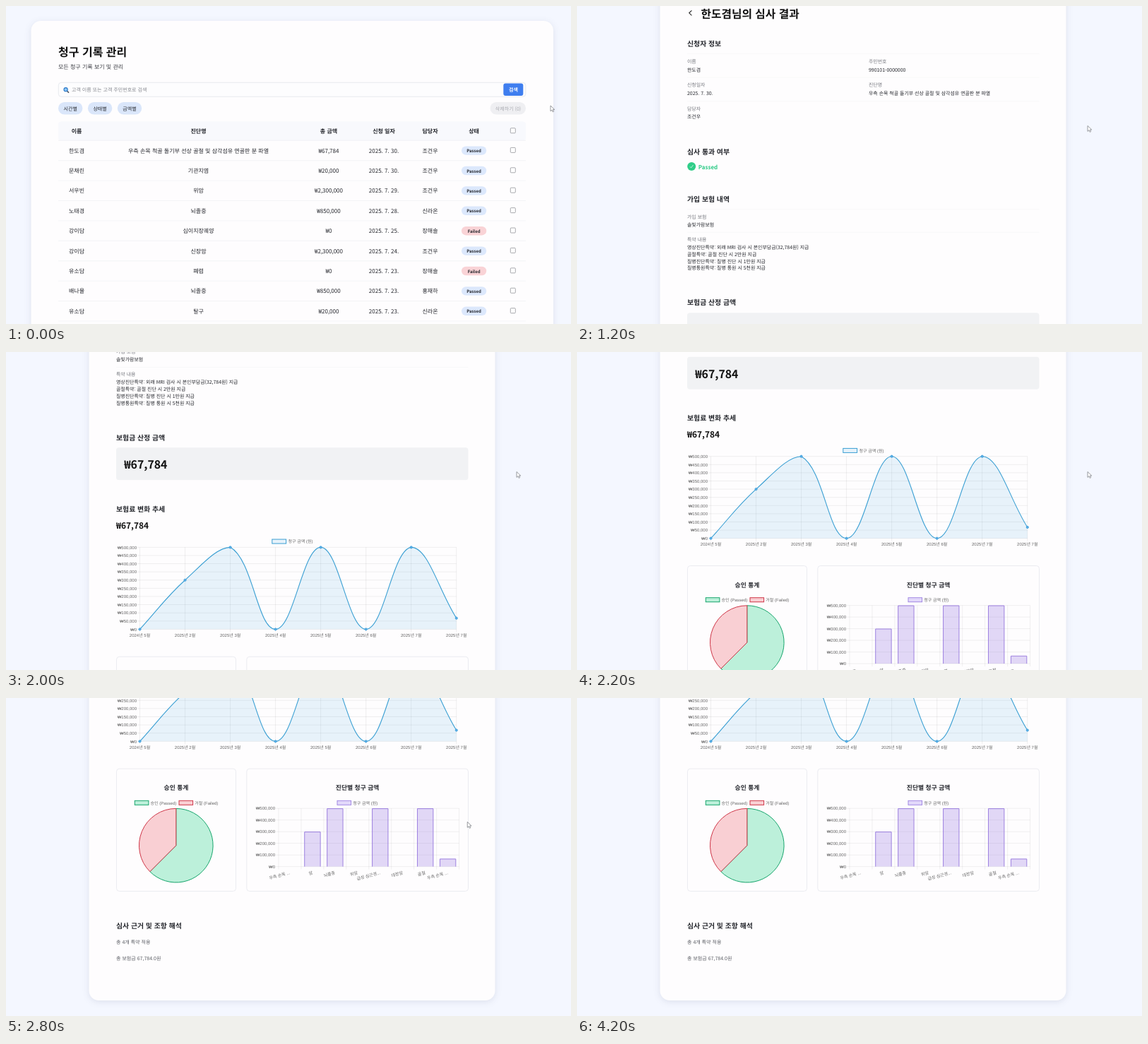
Animation of 800x450 px, one loop 4.3 s. Source, as an HTML page:

```html
<!DOCTYPE html>
<html lang="ko">
<head>
<meta charset="utf-8">
<title>청구 기록 관리</title>
<style>
html, body { margin: 0; width: 100%; height: 100%; overflow: hidden; background: #f4f7ff; }
svg { display: block; width: 800px; height: 450px; }
text {
  font-family: "Noto Sans CJK KR", "Noto Sans CJK", "Noto Sans", sans-serif;
  white-space: pre; text-rendering: geometricPrecision;
}
.ui { font-family: "Liberation Sans", "Noto Sans CJK KR", sans-serif; }
.card { fill: #fefdfe; filter: drop-shadow(0 2px 5px rgba(40, 50, 90, .11)); }
</style>
</head>
<body>
<svg id="stage" viewBox="0 0 800 450"></svg>
<script>
const LOOP = 4300, CUT = 500;
const INK = '#24262c', GREY = '#76787f';
const DIAGNOSIS = '우측 손목 척골 돌기부 선상 골절 및 삼각섬유 연골판 분 파열';
const PIE = { x: 240.8, y: 933.9, r: 52.3 };

// y is the optical middle of the line
function text(x, y, size, str, { fill = INK, weight = 400, anchor = 'start', cls = '', extra = '' } = {}) {
  return `<text class="${cls}" x="${x}" y="${y + size * .37}" font-size="${size}" fill="${fill}" ` +
    `font-weight="${weight}" text-anchor="${anchor}" ${extra}>${str}</text>`;
}
const mid = (x, y, size, str, o = {}) => text(x, y, size, str, { anchor: 'middle', ...o });
const ui = (x, y, str, o = {}) => text(x, y, 6, str, { cls: 'ui', fill: '#666', ...o });

function rect(x, y, w, h, r, fill, stroke = 'none', sw = 1) {
  return `<rect x="${x}" y="${y}" width="${w}" height="${h}" rx="${r}" fill="${fill}" stroke="${stroke}" stroke-width="${sw}"/>`;
}
function path(d, stroke, sw = 1, fill = 'none', extra = '') {
  return `<path d="${d}" fill="${fill}" stroke="${stroke}" stroke-width="${sw}" ${extra}/>`;
}
const card = (x, y, w, h) => `<rect class="card" x="${x}" y="${y}" width="${w}" height="${h}" rx="14"/>`;
const rule = (y, color = '#f6f6f8', x1 = 156, x2 = 654.5) => path(`M${x1} ${y}H${x2}`, color, .7);
const won = n => '₩' + n.toLocaleString('en-US');

function listPage() {
  const cols = [100, 272.5, 457, 535, 600.5, 662.5];
  const heads = ['이름', '진단명', '총 금액', '신청 일자', '담당자', '상태'];
  const rows = [
    ['한도겸', DIAGNOSIS, 67784, 30, '조건우'],
    ['문채린', '기관지염', 20000, 30, '조건우'],
    ['서우빈', '위암', 2300000, 29, '조건우'],
    ['노태경', '뇌졸중', 850000, 28, '신라온'],
    ['강이담', '십이지장궤양', 0, 25, '장해솔'],
    ['강이담', '신장암', 2300000, 24, '조건우'],
    ['유소담', '폐렴', 0, 23, '장해솔'],
    ['배나율', '뇌졸중', 850000, 23, '홍재하'],
    ['유소담', '탈구', 20000, 23, '신라온']
  ];
  const box = y => rect(714.3, y - 3.7, 7, 7, 1, '#fff', '#85868c', .7);
  let s = card(35.5, 21, 739.5, 460);
  s += text(74, 65.5, 16, '청구 기록 관리', { weight: 700, fill: '#111' });
  s += text(74, 86, 8, '모든 청구 기록 보기 및 관리', { fill: '#3a3c42' });
  s += rect(74.3, 108.3, 661.5, 20, 4, '#fdfdfe', '#dfe2e9', .7);
  s += path('M86.6 120.4l2.4 2.4', '#4b4f5a', 1.5) +
    '<circle cx="84.6" cy="118.2" r="2.6" fill="#8ec6f4" stroke="#2b78c8" stroke-width="1.1"/>';
  s += text(93, 118.3, 7, '고객 이름 또는 고객 주민번호로 검색', { fill: '#85878e' });
  s += rect(704.3, 109.5, 28, 17.6, 3, '#3f7eef') + mid(718.4, 118.5, 7, '검색', { fill: '#fff', weight: 600 });
  ['시간별', '상태별', '금액별'].forEach((name, i) => {
    const x = 74 + i * 41.9;
    s += rect(x, 136, 34.4, 17.6, 8.8, '#dae6fa') + mid(x + 17.2, 145, 7, name);
  });
  s += rect(685.5, 136, 50.5, 17.6, 8.8, '#efeff2') + mid(711, 145, 7, '삭제하기 (0)', { fill: '#a8aab0' });
  s += rect(74, 163.5, 662, 26.7, 4, '#f8f9fd');
  heads.forEach((h, i) => s += mid(cols[i], 177, 8, h, { weight: 600 }));
  s += box(176.5) + rule(190.3, '#eceef2', 74, 736);
  rows.forEach(([name, cause, sum, day, clerk], i) => {
    const y = 204.6 + i * 28.4, ok = sum > 0;
    [name, cause, won(sum), `2025. 7. ${day}.`, clerk].forEach((v, c) => s += mid(cols[c], y, 8, v));
    s += rect(645, y - 6.2, 35.2, 12.4, 6.2, ok ? '#dce8fc' : '#f9d3d6');
    s += mid(662.6, y + .3, 6, ok ? 'Passed' : 'Failed', { weight: 600 });
    s += box(y - .5) + rule(y + 14.1, '#f0f1f4', 74, 736);
  });
  return s;
}

function lineChart() {
  const x0 = 189.5, dx = 64.04, top = 670.5, base = 786.5;
  const vals = [0, 300, 500, 0, 500, 0, 500, 67.784];
  const months = ['2024년 5월', ...[2, 3, 4, 5, 6, 7, 7].map(m => `2025년 ${m}월`)];
  const pts = vals.map((v, i) => [x0 + i * dx, base - (base - top) * v / 500]);
  const right = x0 + 7 * dx;
  const cap = y => Math.max(top, Math.min(base, y));
  const handles = pts.map((p, i) => {
    const a = pts[i - 1] || p, b = pts[i + 1] || p;
    const d1 = Math.hypot(p[0] - a[0], p[1] - a[1]), d2 = Math.hypot(b[0] - p[0], b[1] - p[1]);
    const f1 = .4 * d1 / (d1 + d2), f2 = .4 * d2 / (d1 + d2), vx = b[0] - a[0], vy = b[1] - a[1];
    return [[p[0] - f1 * vx, cap(p[1] - f1 * vy)], [p[0] + f2 * vx, cap(p[1] + f2 * vy)]];
  });
  let d = 'M' + pts[0], s = '';
  for (let i = 1; i < pts.length; i++) d += `C${handles[i - 1][1]} ${handles[i][0]} ${pts[i]}`;
  let grid = '';
  for (let i = 0; i <= 10; i++) {
    const y = top + i * 11.6;
    grid += `M${x0 - 4} ${y}H${right}`;
    s += ui(185, y, won(500000 - i * 50000), { anchor: 'end' });
  }
  pts.forEach(([x], i) => {
    grid += `M${x} ${top}V${base + 4}`;
    s += ui(x, 794.6, months[i], { anchor: 'middle' });
  });
  s += path(grid, 'rgba(0,0,0,.11)', .6);
  s += path(`${d}V${base}H${x0}Z`, 'none', 0, 'rgba(52,152,219,.11)');
  s += path(d, '#3a9fd3', 1.1);
  pts.forEach(p => s += `<circle cx="${p[0]}" cy="${p[1]}" r="1.6" fill="#5fb2e6" stroke="#3498db" stroke-width=".8"/>`);
  s += rect(376.8, 659.2, 19.8, 6, 0, '#e6f2fb', '#3a9fd3', 1);
  return s + ui(399.5, 662.2, '청구 금액 (원)');
}

function pieChart() {
  const { x, y, r } = PIE, k = r * Math.SQRT1_2;
  const end = `${x - k} ${y + k}`;
  let s = rect(156.5, 825.3, 169, 173.3, 4, '#fefdfe', '#e6e8ee', .8);
  s += mid(241, 852.2, 8.8, '승인 통계', { weight: 700 });
  s += rect(182.3, 870.5, 19.6, 6, 0, '#bcf0da', '#17a56c') + ui(204.5, 873.5, '승인 (Passed)');
  s += rect(245, 870.5, 19.6, 6, 0, '#f9cfd3', '#cf3547') + ui(267.3, 873.5, '거절 (Failed)');
  s += path(`M${x} ${y}V${y - r}A${r} ${r} 0 1 1 ${end}Z`, '#17a56c', 1, '#bcf0da', 'id="yes" stroke-linejoin="bevel"');
  s += path(`M${x} ${y}L${end}A${r} ${r} 0 0 1 ${x} ${y - r}Z`, '#cf3547', 1, '#f9cfd3', 'id="no" stroke-linejoin="bevel"');
  return s;
}

function barChart() {
  const x0 = 386, dx = 31.95, top = 881.4, base = 963.8;
  const vals = [0, 300, 500, 0, 500, 0, 500, 67.784];
  const names = ['우측 손목 ...', '암', '뇌졸중', '위암', '급성 심근경...', '대장암', '골절', '우측 손목 ...'];
  let s = rect(340.8, 825.3, 313.7, 173.3, 4, '#fefdfe', '#e6e8ee', .8), grid = '', bars = '';
  s += mid(497.6, 852.2, 8.8, '진단별 청구 금액', { weight: 700 });
  s += rect(469, 870.5, 19.6, 6, 0, '#e2d8fa', '#9b7fe0', .9) + ui(491.3, 873.5, '청구 금액 (원)');
  for (let i = 0; i <= 5; i++) {
    const y = top + (base - top) * i / 5;
    grid += `M${x0 - 4} ${y}H${x0 + 8 * dx}`;
    s += ui(381, y, won(500000 - i * 100000), { anchor: 'end' });
  }
  for (let i = 0; i <= 8; i++) grid += `M${x0 + i * dx} ${top}V${base + 4}`;
  vals.forEach((v, i) => {
    const c = x0 + (i + .5) * dx, y = base - (base - top) * v / 500;
    if (v) bars += path(`M${c - 11.2} ${base}V${y + .4}H${c + 11.2}V${base}`, '#9575dd', .9, 'rgba(149,117,221,.28)');
    s += ui(c, 972.2, names[i], { anchor: 'end', extra: `transform="rotate(-15 ${c} 972.2)"` });
  });
  return s + path(grid, 'rgba(0,0,0,.1)', .6) + bars;
}

function detailPage() {
  const head = (y, str) => text(156, y, 9.9, str, { weight: 600 });
  const value = (x, y, str) => text(x, y, 6.93, str, { weight: 500 });
  const field = (x, y, label, str) => text(x, y, 6.93, label, { fill: GREY }) + value(x, y + 11.6, str);
  let s = rect(0, 0, 800, 28, 0, '#fefdfe') + rule(28.3, '#eaecf2', 0, 800);
  s += '<circle cx="31" cy="14" r="7" fill="#12408f"/>';
  s += text(53, 15, 11.3, 'ProofHarbor', { weight: 500, fill: '#1b2130' });
  s += text(695, 13, 8, 'Management', { cls: 'ui', fill: '#222' }) + text(765, 13, 8, 'Logout', { cls: 'ui', fill: '#222' });
  s += card(117.5, 69.5, 575, 1083.8);
  s += path('M162.4 101.6l-3.6 3.5 3.6 3.5', '#222', 1.1);
  s += text(175.5, 106, 15.75, '한도겸님의 심사 결과', { weight: 700, fill: '#111' });
  s += head(149, '신청자 정보');
  [163, 196.5, 230, 383, 415.6].forEach(y => s += rule(y));
  s += field(156, 174, '이름', '한도겸') + field(413, 174, '주민번호', '990101-0000000');
  s += field(156, 207, '신청일자', '2025. 7. 30.') + field(413, 207, '진단명', DIAGNOSIS);
  s += field(156, 240.3, '담당자', '조건우');
  s += head(302, '심사 통과 여부') + '<circle cx="162.2" cy="322.2" r="6" fill="#2fcd88"/>';
  s += path('M160 322.6l1.5 1.7 3-4', '#dff8ec', .8);
  s += text(171.8, 322.9, 8, 'Passed', { weight: 600, fill: '#2dca86' });
  s += head(368.6, '가입 보험 내역') + field(156, 393.4, '가입 보험', '솔빛가람보험');
  s += text(156, 425.5, 6.93, '특약 내용', { fill: GREY });
  ['영상진단특약: 외래 MRI 검사 시 본인부담금(32,784원) 지급', '골절특약: 골절 진단 시 2만원 지급',
    '질병진단특약: 질병 진단 시 1만원 지급', '질병통원특약: 질병 통원 시 5천원 지급']
    .forEach((str, i) => s += value(156, 437 + i * 9.7, str));
  s += head(515, '보험금 산정 금액') + rect(156, 529.5, 498.5, 46, 4, '#f1f2f4');
  s += text(167.3, 553.6, 15.8, won(67784), { weight: 700, fill: '#111' });
  s += head(616, '보험료 변화 추세') + text(156, 639.8, 11.9, won(67784), { weight: 700, fill: '#111' });
  s += lineChart() + pieChart() + barChart();
  s += head(1047.2, '심사 근거 및 조항 해석');
  s += text(156, 1070.8, 7, '총 4개 특약 적용', { fill: '#5c5e65' });
  s += text(156, 1093.6, 7, '총 보험금 67,784.0원', { fill: '#5c5e65' });
  return s;
}

function tooltip() {
  return path('M217 216l3-3v6z', 'none', 0, 'rgba(0,0,0,.83)') +
    rect(219.4, 204.8, 41.6, 22.2, 3, 'rgba(0,0,0,.83)') +
    ui(222.2, 211, '거절 (Failed)', { fill: '#fff', weight: 700 }) +
    rect(222.6, 218.2, 5.4, 5.4, 0, '#f5a9b0', '#fff', .6) +
    ui(229.2, 221, '3', { fill: '#fff' });
}

const arrow = path('M0 0V7.9L1.9 6.2 3.2 8.9 4.6 8.2 3.3 5.6H5.8Z', '#6f7178', .7, '#fff', 'stroke-linejoin="round"');
const $ = id => document.getElementById(id);
$('stage').innerHTML = rect(0, 0, 800, 450, 0, '#f4f7ff') +
  `<g id="list">${listPage()}</g><g id="detail">${detailPage()}</g>` +
  `<g id="tip">${tooltip()}</g><g id="cursor">${arrow}</g>`;

const scrollKeys = [[900, 0], [1200, 95], [1600, 205.5], [2000, 393.5], [2400, 650.8], [2600, 725.2]];
const cursorKeys = [[0, 771, 141], [400, 296, 201], [700, 296, 201], [1100, 723, 169.5], [2200, 723, 169.5],
  [2400, 728, 169.5], [2650, 732, 170], [3250, 234, 204], [3500, 234, 204], [3900, 236, -14]];

function at(keys, t, ease = u => u) {
  if (t <= keys[0][0]) return keys[0].slice(1);
  for (let i = 1; i < keys.length; i++) {
    const a = keys[i - 1], b = keys[i];
    if (t < b[0]) {
      const u = ease((t - a[0]) / (b[0] - a[0]));
      return a.slice(1).map((v, k) => v + (b[k + 1] - v) * u);
    }
  }
  return keys[keys.length - 1].slice(1);
}
const smooth = u => u * u * (3 - 2 * u);
const show = (id, on) => $(id).setAttribute('display', on ? 'inline' : 'none');

function draw(t) {
  const [scroll] = at(scrollKeys, t);
  const [cx, cy] = at(cursorKeys, t, smooth);
  show('list', t < CUT);
  show('detail', t >= CUT);
  $('detail').setAttribute('transform', `translate(0 ${-scroll})`);
  $('cursor').setAttribute('transform', `translate(${cx} ${cy})`);
  const dx = cx - PIE.x, dy = cy + scroll - PIE.y;
  const over = t > 2600 && Math.hypot(dx, dy) < PIE.r;
  $('yes').setAttribute('fill', over ? '#2ca974' : '#bcf0da');
  $('no').setAttribute('fill', over ? '#f9adb4' : '#f9cfd3');
  show('tip', over && dx < 0);
}

const start = performance.now();
function tick() {
  draw((performance.now() - start) % LOOP);
  requestAnimationFrame(tick);
}
tick();
</script>
</body>
</html>
```
